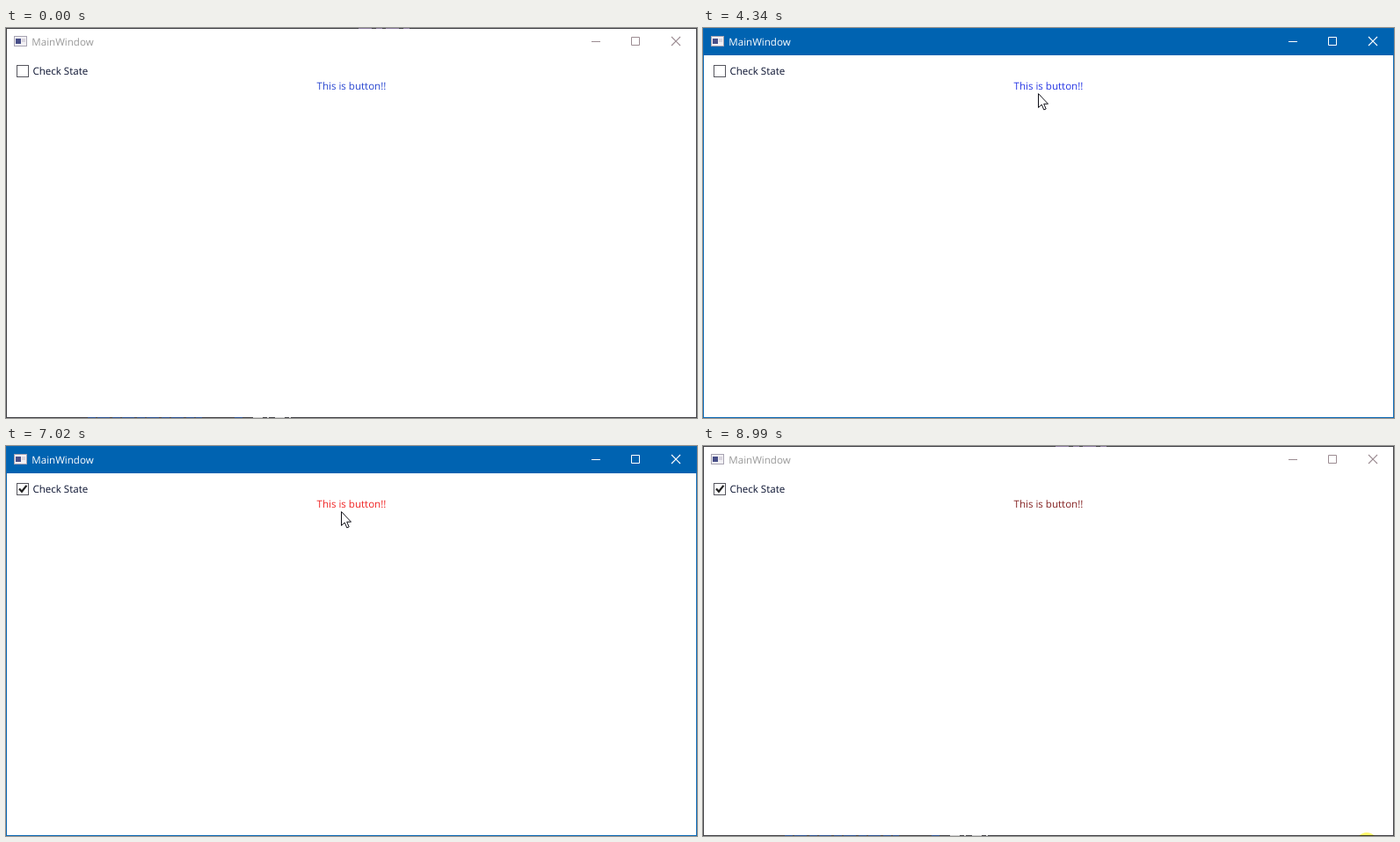
Write an HTML page that moves like this. It is 786x443 px and loops after 9050 ms.

```html
<!DOCTYPE html>
<html lang="en">
<head>
<meta charset="utf-8">
<title>Main window</title>
<style>
html, body { margin: 0; width: 100%; height: 100%; overflow: hidden; background: #fff; }
svg { display: block; width: 786px; height: 443px; }
text { font: 11.55px "Open Sans", "Noto Sans", sans-serif; text-rendering: geometricPrecision; white-space: pre; }
.small { font-size: 10.8px; }
.line { fill: none; stroke-width: 1; }
.crisp { shape-rendering: crispEdges; }
#dialog { filter: drop-shadow(0 3px 7px rgba(0, 0, 0, .38)); }
#halo { mix-blend-mode: multiply; }
</style>
</head>
<body>
<svg viewBox="0 0 786 443">
  <rect width="786" height="443" fill="#fff"/>
  <rect id="bar" class="crisp" width="786" height="31"/>
  <rect id="frame" class="line crisp" x=".5" y=".5" width="785" height="442"/>
  <g id="edge" class="line crisp">
    <path d="M401 .5H461" stroke="#8a7a9c" stroke-dasharray="15 5 7 4"/>
    <path d="M93 442.5H223M260 442.5H271" stroke="#2a5090" stroke-dasharray="9 2 14 3"/>
    <path d="M281 442.5H325" stroke="#ccc" stroke-dasharray="11 5 2 7"/>
  </g>
  <g class="crisp">
    <rect x="9.5" y="9.5" width="14" height="11" fill="#f2f0f4" stroke="#a8a4b2"/>
    <rect x="11" y="12" width="6" height="6" fill="#484f88"/>
    <rect x="18" y="12" width="4" height="4" fill="#d8d4de"/>
  </g>
  <text id="title" x="29.3" y="20">MainWindow</text>
  <g id="caption" class="line">
    <path d="M666 15.5H676M711.5 10.5H720.5V19.5H711.5Z"/>
    <path d="M757 10L767 20M767 10L757 20" stroke-width="1.15"/>
  </g>

  <rect id="box" x="12.5" y="42.5" width="13" height="13"/>
  <path id="tick" d="M15 48.4L18 51.8L23.4 44.9" fill="none" stroke="#212121" stroke-width="2.2"/>
  <text x="30.4" y="53" fill="#0a1230">Check State</text>
  <text id="label" x="353.5" y="70">This is button!!</text>

  <g id="dialog">
    <rect x="566" y="200" width="119" height="133" fill="#0a6cbd"/>
    <rect x="567" y="201" width="117" height="30" fill="#0063b1"/>
    <rect x="567" y="231" width="117" height="59" fill="#fff"/>
    <rect x="567" y="290" width="117" height="42" fill="#f0f0f0"/>
    <path class="line" d="M664.3 210.3L673.7 219.7M673.7 210.3L664.3 219.7" stroke="#fff" style="stroke-width:1.4"/>
    <text class="small" x="577.7" y="265" fill="#10101c">Hello!!</text>
    <g class="line crisp">
      <rect x="594.5" y="299.5" width="74" height="22" fill="#f0f0f0" stroke="#5a5052"/>
      <path d="M595.5 320V300.5H667" stroke="#fff"/>
      <path d="M596 320.5H667.5V300" stroke="#6a6464"/>
    </g>
    <text class="small" x="623.7" y="314" fill="#341818">OK</text>
  </g>

  <circle id="halo" r="12" fill="#fff96c"/>
  <path id="cursor" d="M.5 .6V16.4L4.2 13L6.8 18.9L9.2 17.9L6.7 12.2H11.5Z" fill="#fff" stroke="#101018"/>
</svg>
<script>
const LOOP = 9050, TICK = 60, HOLD = 60, OPEN = 120, FADE = 120;
const $ = id => document.getElementById(id);
const set = (id, attrs) => {
  for (const k in attrs) $(id).setAttribute(k, attrs[k]);
};
const show = (id, on) => set(id, { visibility: on ? "visible" : "hidden" });

// The pointer's tour: what it visits, when it sets out and arrives, when it clicks.
const entry = [752, 460];
const visits = [
  { on: "check", at: [60, 50], go: 160, arrive: 970, clicks: [1590, 2300] },
  { on: "button", at: [381, 74], go: 2580, arrive: 2760, clicks: [3250, 3460, 4250, 4560] },
  { on: "ok", at: [626, 309], go: 5140, arrive: 5500, clicks: [5590] },
  { on: "check", at: [60, 52], go: 5800, arrive: 6160, clicks: [6280] },
  { on: "button", at: [381, 74], go: 6560, arrive: 6960, clicks: [] },
  { on: "button", at: [381, 68], go: 7080, arrive: 7080, clicks: [7110] },
  { on: "ok", at: [650, 307], go: 7630, arrive: 7990, clicks: [8170] },
  { on: "away", at: [755, 451], go: 8400, arrive: 8830, clicks: [8990] }
];

// Effect of a click, given the time since it was pressed.
const effects = {
  check(s, age) {
    s.active = true;
    if (age >= HOLD) s.checked = !s.checked;
  },
  button(s, age, last) {
    if (!last || age < OPEN) return;
    s.active = false;
    s.dialog = Math.min(1, .35 + (age - OPEN) / FADE);
  },
  ok(s, age) {
    if (age < HOLD) return;
    s.active = true;
    s.dialog = 0;
  },
  away(s) { s.active = false; }
};

const ease = p => p < .5 ? 2 * p * p : 1 - 2 * (1 - p) * (1 - p);

function stateAt(t) {
  const s = { active: false, checked: false, down: false, dialog: 0 };
  let [x, y] = entry;
  for (const { on, at, go, arrive, clicks } of visits) {
    if (t < go) break;
    const step = (Math.floor((t - go) / TICK) + 1) * TICK;
    const p = t >= arrive ? 1 : ease(Math.min(1, step / (arrive - go + TICK)));
    x += (at[0] - x) * p;
    y += (at[1] - y) * p;
    clicks.forEach((c, i) => {
      if (t < c) return;
      s.down = t < c + HOLD;
      effects[on](s, t - c, i === clicks.length - 1);
    });
  }
  return { ...s, x: Math.round(x), y: Math.round(y) };
}

function inkFor({ checked, active }) {
  if (checked) return active ? "#f02424" : "#842222";
  return active ? "#2636e4" : "#2846d0";
}

function draw(t) {
  const s = stateAt(t), { x, y, active, down } = s;
  const over = x >= 12 && x < 95 && y >= 42 && y < 57;

  set("bar", { fill: active ? "#0063b1" : "#fff" });
  set("frame", { stroke: active ? "#0a68b4" : "#404044" });
  show("edge", !active);
  set("title", { fill: active ? "#fff" : "#999" });
  set("caption", { stroke: active ? "#fff" : "#9c8c92" });

  set("box", {
    fill: !over ? "#fff" : down ? "#d9f0ff" : "#f3f9ff",
    stroke: !over ? "#56565e" : down ? "#3c7fc4" : "#5593ff"
  });
  show("tick", s.checked);
  set("label", { fill: inkFor(s) });

  set("dialog", { opacity: s.dialog });
  show("dialog", s.dialog > 0);
  set("halo", { cx: x, cy: y });
  show("halo", down);
  set("cursor", { transform: `translate(${x} ${y})` });
}

const begin = performance.now();
function loop() {
  draw((performance.now() - begin) % LOOP);
  requestAnimationFrame(loop);
}
loop();
</script>
</body>
</html>
```
